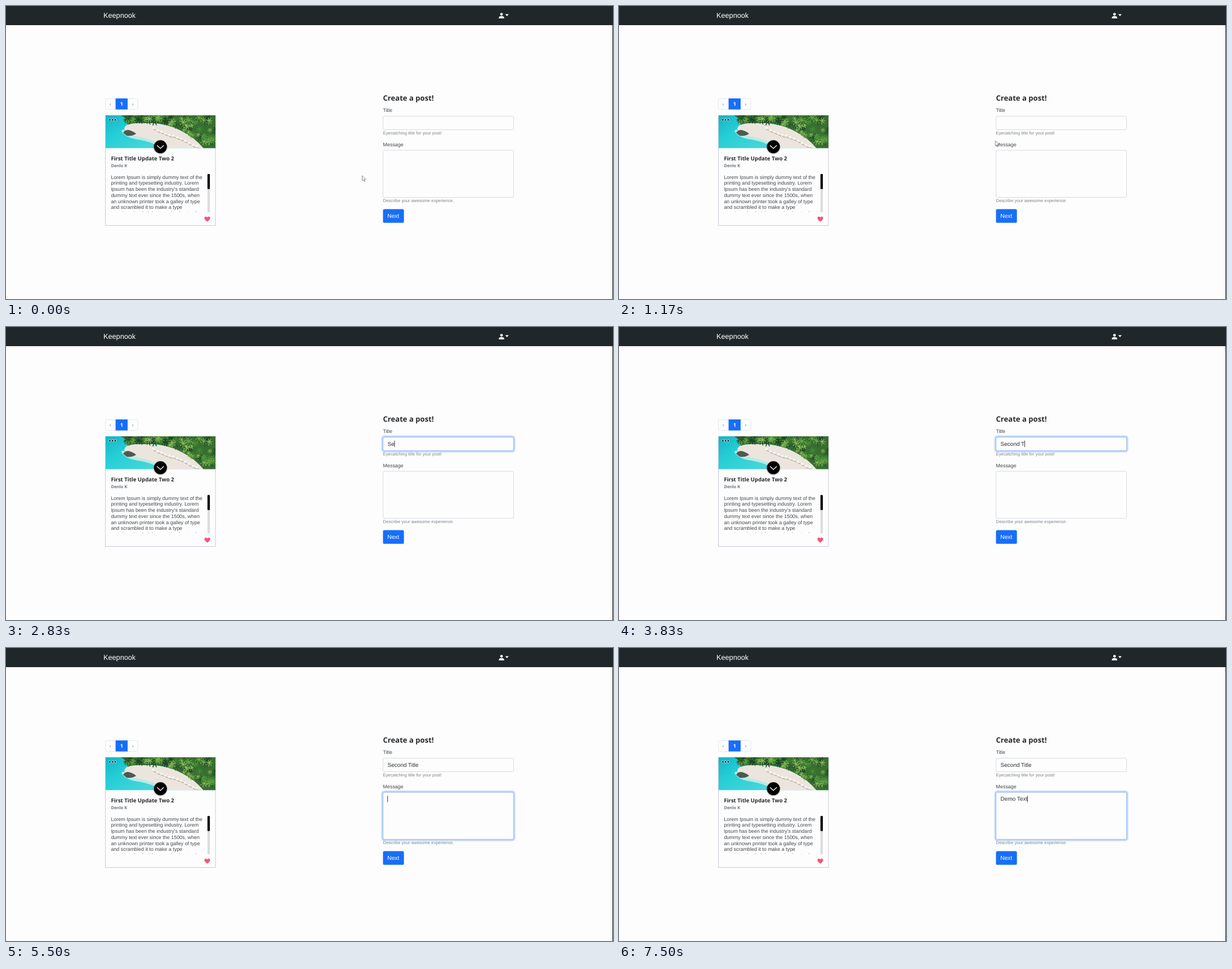
Write an HTML page that moves like this. It is 1078x520 px and loops after 8000 ms.

```html
<!DOCTYPE html>
<html lang="en">
<head>
<meta charset="utf-8">
<title>Create a post</title>
<style>
  html, body { margin: 0; width: 100%; height: 100%; overflow: hidden; background: #fdfdfd; }
  svg { display: block; width: 1078px; height: 520px; }
  text {
    font-family: "Liberation Sans", Arial, sans-serif;
    fill: #42474c; white-space: pre; text-rendering: geometricPrecision;
  }
  .head { font-family: "Open Sans", "Noto Sans", sans-serif; font-weight: 700; fill: #26292d; }
  .label { font-size: 8.95px; }
  .help { font-size: 7.8px; fill: #7d838a; }
  .field { font-size: 10px; fill: #2c3034; }
  .light { fill: #fff; }
  .box { fill: #fdfdfd; stroke: #d6dae2; }
  .glow { fill: none; stroke: #0d6efd; stroke-opacity: .25; stroke-width: 2.5; }
  .ring { fill: none; stroke: #8fbafa; }
</style>
</head>
<body>
<svg viewBox="0 0 1078 520">
  <defs>
    <linearGradient id="sea" x1="0" y1="0" x2="1" y2=".5">
      <stop offset="0" stop-color="#14b4c6"/>
      <stop offset=".3" stop-color="#25ced6"/>
      <stop offset="1" stop-color="#62dcda"/>
    </linearGradient>
    <clipPath id="photoClip"><rect x="177" y="194" width="195" height="58.3"/></clipPath>
    <clipPath id="bodyClip"><rect x="180" y="296" width="174" height="69.6"/></clipPath>
  </defs>

  <rect width="1078" height="34" fill="#20272b"/>
  <text class="light" x="173" y="21" font-size="12.7">Keepnook</text>
  <g fill="#fff">
    <circle cx="880" cy="14.6" r="2.4"/>
    <path d="M875.3 22v-1.2c0-2.2 2.4-3 4.7-3s4.7.8 4.7 3V22zM886.6 14.6h6.2l-3.1 3.3z"/>
  </g>

  <rect x="176.5" y="164.5" width="57.5" height="19" rx="2.5" fill="#fdfdfd" stroke="#e4e7eb"/>
  <rect x="194.6" y="164" width="21.4" height="19.6" fill="#176ff8"/>
  <g text-anchor="middle" font-size="9">
    <text x="185.3" y="177" fill-opacity=".7">‹</text>
    <text class="head light" x="205.3" y="177.2">1</text>
    <text x="225" y="177" fill-opacity=".7">›</text>
  </g>

  <rect x="176.5" y="194.3" width="195.5" height="195.2" fill="#fdfdfd" stroke="#c9c9d8"/>
  <g clip-path="url(#photoClip)">
    <rect x="176" y="194" width="197" height="59" fill="url(#sea)"/>
    <path d="M207 220Q212 232 238 235Q262 239 286 254" fill="none" stroke="#b4ece6" stroke-width="5"/>
    <path d="M210 218Q212 208 232 207Q282 206 318 222L360 254H290Q264 238 240 233Q214 230 210 218z" fill="#ebe5de"/>
    <path d="M208 225q5-7 13-4t10 6q-9 5-17 3z" fill="#4e5a50"/>
    <path d="M216 211Q218 201 204 194H373V254H352Q336 234 312 222Q280 205 245 208Q226 207 216 211z" fill="#386f30"/>
    <g id="palms" fill="none" stroke-linecap="round"/>
    <g id="shades" fill="#fbf8f3"/>
  </g>
  <g stroke="#fff" stroke-width=".7">
    <circle cx="184.4" cy="202" r="1.8"/><circle cx="189.2" cy="202" r="1.8"/><circle cx="194" cy="202" r="1.8"/>
  </g>
  <circle cx="274.2" cy="250.4" r="12.6" fill="#000" opacity=".2"/>
  <circle cx="274.2" cy="249.8" r="11.5"/>
  <path d="M268.2 247.3l6 5.6 6-5.6" fill="none" stroke="#fff" stroke-width="1.4"/>

  <text class="head" x="186.4" y="273.6" font-size="9.55">First Title Update Two 2</text>
  <text class="head" x="186.4" y="286" font-size="7.5" style="fill:#6c757d">Denlo K</text>
  <g id="body" class="label" clip-path="url(#bodyClip)"></g>
  <rect x="357.8" y="298" width="4.2" height="68" fill="#dcdcdc"/>
  <rect x="357.8" y="298" width="4.2" height="27" rx="1.6" fill="#000"/>
  <path d="M357.5 382.8C354 379.8 352.4 378.4 352.4 376.4C352.4 373.4 356.2 372.8 357.5 375.6C358.8 372.8 362.6 373.4 362.6 376.4C362.6 378.4 361 379.8 357.5 382.8z" fill="#f4557a"/>

  <text class="head" x="669.5" y="167.8" font-size="13.1">Create a post!</text>
  <text class="label" x="669.5" y="188">Title</text>
  <text class="help" x="669.5" y="228">Eyecatching title for your post!</text>
  <text class="label" x="669.5" y="248.7">Message</text>
  <text class="help" x="669.5" y="348.3">Describe your awesome experience.</text>
  <rect x="669.5" y="360.5" width="37.2" height="24.3" rx="2.6" fill="#176ff8"/>
  <text class="light" x="677.3" y="376.1" font-size="10.2">Next</text>
  <g id="form"></g>

  <path id="cursor" d="M0 0v9.2l2.1-2 1.5 3.4 1.5-.7-1.5-3.2h2.9z" fill="#fff" stroke="#5c5c5c" stroke-width=".7"/>
  <rect x="1077" width="1" height="520" fill="#1b1f22"/>
</svg>

<script>
const LOOP = 8000, FADE = 150, BLINK = 530;
const $ = id => document.getElementById(id);

function add(parent, tag, attrs, text) {
  const el = document.createElementNS('http://www.w3.org/2000/svg', tag);
  for (const key in attrs) el.setAttribute(key, attrs[key]);
  if (text) el.textContent = text;
  parent.append(el);
  return el;
}

let seed = 7;
const rand = (a, b) => {
  seed = (seed * 16807) % 2147483647;
  return a + (b - a) * seed / 2147483647;
};

function drawBeach() {
  const greens = ['#24522a', '#468f35', '#69a845', '#1b4325', '#8bbd5c'];
  for (let i = 0; i < 100; i++) {
    const x = rand(214, 374), low = 205 + Math.max(0, x - 280) * .5;
    const y = rand(194, low), r = rand(3, 7), turn = rand(0, 6);
    let d = '';
    for (let k = 0; k < 7; k++) {
      const a = turn + k * Math.PI * 2 / 7, c = Math.cos(a) * r, s = Math.sin(a) * r;
      d += `M${x} ${y}q${c * .5} ${s * .5 - 1.5} ${c} ${s}`;
    }
    add($('palms'), 'path', { d, stroke: greens[i % 5], 'stroke-width': rand(.8, 1.6) });
  }
  for (let i = 0; i < 12; i++) {
    const x = 262 + i * 7, y = 217 + i * 2.8 + rand(-2, 2);
    add($('palms'), 'path', { d: `M${x} ${y + 3}l5 1.5`, stroke: '#a99c8c', 'stroke-width': 1 });
    add($('shades'), 'ellipse', { cx: x, cy: y, rx: 2.4, ry: 1.4 });
  }
}

[
  'Lorem Ipsum is simply dummy text of the',
  'printing and typesetting industry. Lorem',
  "Ipsum has been the industry's standard",
  'dummy text ever since the 1500s, when',
  'an unknown printer took a galley of type',
  'and scrambled it to make a type',
  'specimen book. It has survived not only'
].forEach((line, i) => add($('body'), 'text', { x: 186.4, y: 306.8 + i * 10.68 }, line));

function makeField(y, height, textY, spec) {
  const rect = { x: 669.5, y, width: 232, height, rx: 2.6 };
  const form = $('form');
  add(form, 'rect', { ...rect, class: 'box' });
  const focus = add(form, 'g', {});
  add(focus, 'rect', { x: 667.8, y: y - 1.7, width: 235.4, height: height + 3.4, rx: 4, class: 'glow' });
  add(focus, 'rect', { ...rect, class: 'ring' });
  const text = add(form, 'text', { x: 677.6, y: textY, class: 'field' });
  const caret = add(form, 'rect', { y: textY - 9, width: .9, height: 11.4, fill: '#222' });
  return { ...spec, focus, text, caret };
}

const fields = [
  makeField(195.5, 24, 210.6, {
    value: 'Second Title', from: 1430, to: 5300,
    keys: [2630, 2830, 3070, 3130, 3300, 3430, 3600, 3830, 3930, 4000, 4170, 4270]
  }),
  makeField(256, 83.7, 271.2, {
    value: 'Demo Text', from: 5300, to: LOOP + FADE,
    keys: [6000, 6200, 6270, 6430, 6600, 6770, 6900, 7230, 7500]
  })
];

const clamp = v => Math.min(1, Math.max(0, v));
const ease = v => v * v * (3 - 2 * v);

function drawField(f, t) {
  const count = f.keys.filter(k => k <= t).length;
  f.text.textContent = f.value.slice(0, count);
  f.focus.style.opacity = ease(clamp((t - f.from) / FADE)) - ease(clamp((t - f.to) / FADE));
  const last = count ? f.keys[count - 1] : f.from;
  const lit = Math.floor((t - last) / BLINK) % 2 === 0;
  f.caret.style.opacity = t >= f.from && t < f.to && lit ? 1 : 0;
  f.caret.setAttribute('x', 677.3 + (count ? f.text.getComputedTextLength() : 0));
}

// Pointer stops: time, x, y. It disappears over the text at the last one.
const stops = [[700, 632.5, 301], [870, 626, 295.4], [1270, 676, 229]];

function drawCursor(t) {
  const i = t > stops[1][0] ? 1 : 0;
  const [a, b] = [stops[i], stops[i + 1]];
  const k = ease(clamp((t - a[0]) / (b[0] - a[0])));
  const x = a[1] + (b[1] - a[1]) * k, y = a[2] + (b[2] - a[2]) * k;
  $('cursor').setAttribute('transform', `translate(${x} ${y})`);
  $('cursor').style.opacity = t < stops[2][0] ? 1 : 0;
}

function frame() {
  const t = performance.now() % LOOP;
  fields.forEach(f => drawField(f, t));
  drawCursor(t);
  requestAnimationFrame(frame);
}

drawBeach();
frame();
</script>
</body>
</html>
```
